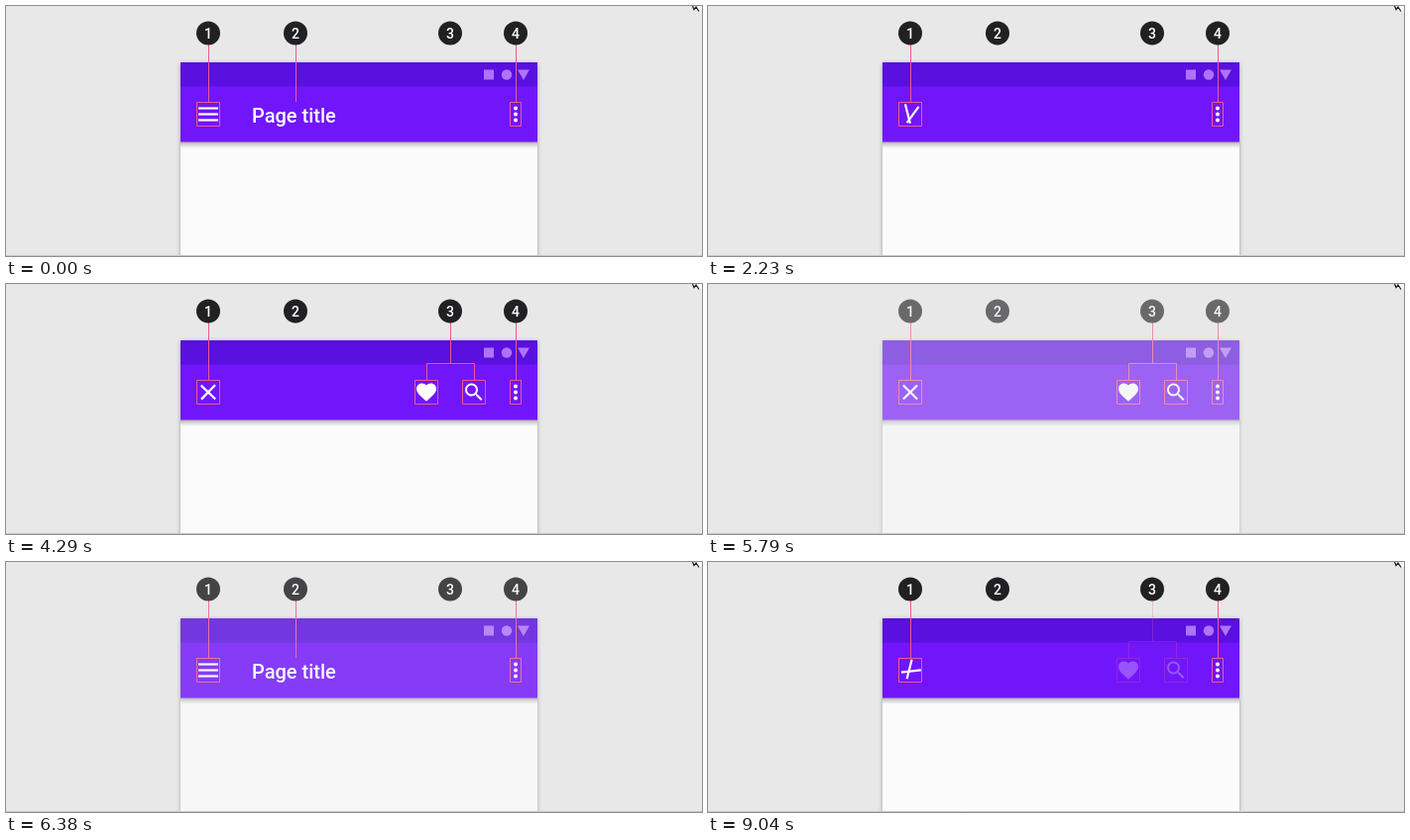
These frames come from a looping animation (702x253 px, 9.14 s). An HTML page:

```html
<!DOCTYPE html>
<html lang="en">
<head>
<meta charset="utf-8">
<title>Top app bar</title>
<style>
html, body { margin: 0; width: 100%; height: 100%; overflow: hidden; background: #e8e8e8; }
svg { display: block; width: 702px; height: 253px; font-family: Roboto, sans-serif; font-weight: 500; }
.guide { fill: none; stroke: #f0588f; stroke-width: 1; }
.badge text { font-size: 14px; fill: #fff; text-anchor: middle; }
</style>
</head>
<body>
<svg viewBox="0 0 702 253">
  <defs>
    <filter id="soft" x="-10%" y="-10%" width="120%" height="120%">
      <feDropShadow dx="0" dy="1" stdDeviation="2" flood-color="#000" flood-opacity=".32"/>
    </filter>
    <linearGradient id="under" x1="0" y1="0" x2="0" y2="1">
      <stop offset="0" stop-color="#000" stop-opacity=".36"/>
      <stop offset=".4" stop-color="#000" stop-opacity=".17"/>
      <stop offset="1" stop-color="#000" stop-opacity="0"/>
    </linearGradient>
  </defs>
  <rect width="702" height="253" fill="#e8e8e8"/>
  <g id="scene">
    <rect x="176" y="57" width="360" height="210" fill="#fbfbfb" filter="url(#soft)"/>
    <rect x="176" y="137" width="360" height="7" fill="url(#under)"/>
    <rect x="176" y="81" width="360" height="56.5" fill="#7116fb"/>
    <rect x="176" y="57" width="360" height="24.5" fill="#5a10df"/>
    <g fill="#ac75f7">
      <rect x="482" y="64.5" width="10" height="10"/>
      <circle cx="505" cy="69.5" r="5.2"/>
      <path d="M516 64.5h12l-6 10.5z"/>
    </g>
    <g id="title">
      <path class="guide" d="M292.5 39V97"/>
      <text x="248" y="117.7" font-size="20" fill="#fff">Page title</text>
    </g>
    <g id="actions">
      <path class="guide" d="M448.5 39V80.5M424.5 97.5V80.5H472.5V97.5M412.5 97.5h23v24h-23zM460.5 97.5h23v24h-23z"/>
      <g fill="#fff">
        <path transform="translate(412 97.5)" d="M12 21.35l-1.45-1.32C5.4 15.36 2 12.28 2 8.5 2 5.42 4.42 3 7.5 3c1.74 0 3.41.81 4.5 2.09C13.09 3.81 14.76 3 16.5 3 19.58 3 22 5.42 22 8.5c0 3.78-3.4 6.86-8.55 11.54z"/>
        <path transform="translate(460 97.5)" d="M15.5 14h-.79l-.28-.27A6.5 6.5 0 1 0 13.73 14.43l.27.28v.79l5 4.99L20.49 19zM9.5 14A4.5 4.5 0 1 1 9.5 5a4.5 4.5 0 0 1 0 9z"/>
      </g>
    </g>
    <path class="guide" d="M204.5 39V97.5M192.5 97.5h23v24h-23zM514.5 39V97.5M508.5 97.5h11v24h-11z"/>
    <g id="icon" stroke="#fff" stroke-width="2.2">
      <path id="top" d="M-10 0H10"/>
      <path id="mid" d="M-10 0H10"/>
      <path id="low" d="M-10 0H10"/>
    </g>
    <g fill="#fff">
      <circle cx="514" cy="103.5" r="2"/>
      <circle cx="514" cy="109.5" r="2"/>
      <circle cx="514" cy="115.5" r="2"/>
    </g>
    <g id="badges" class="badge"></g>
  </g>
  <path d="M0 252.5H702" stroke="#cbcbcb"/>
  <path d="M692 0h10v5l-4 1z" fill="#f8f8f8"/>
  <path d="M692.5 0l1.5 3.5 2-2.5 3 4.5" fill="none" stroke="#222" stroke-width="1.3"/>
</svg>
<script>
const LOOP = 9140, HOLD = 450, STEP = 148.1, REPLAY = 6368;
const OUT = 5640, SWAP = 6030, IN = 6450;
const $ = id => document.getElementById(id);
const ramp = (t, a, b) => Math.min(1, Math.max(0, (t - a) / (b - a)));

$('badges').innerHTML = [204, 292, 448, 514].map((x, i) =>
  `<circle cx="${x}" cy="27.5" r="12" fill="#212124"/><text x="${x}" y="32.5">${i + 1}</text>`).join('');

// cubic-bezier(.4, 0, .2, 1)
function ease(x) {
  let lo = 0, hi = 1;
  for (let i = 0; i < 24; i++) {
    const s = (lo + hi) / 2, r = 1 - s;
    if (1.2 * r * r * s + 0.6 * r * s * s + s * s * s < x) lo = s; else hi = s;
  }
  return lo * lo * (3 - 2 * lo);
}

// The clip advances in fixed steps after an opening hold.
function snap(t) {
  return t < HOLD - 3 ? 0 : HOLD + Math.floor((t - HOLD + 3) / STEP) * STEP;
}

function draw(ms) {
  const t = snap(ms % LOOP);
  const u = t < SWAP ? t : t - REPLAY;
  const p = u < 1000 ? 0 : ease(ramp(u, 860, 4500));
  const gap = 6 * (1 - p), tilt = 45 * p;

  $('scene').setAttribute('opacity', t < SWAP ? 1 - ramp(t, OUT, SWAP) : ramp(t, SWAP, IN));
  $('title').setAttribute('opacity', 1 - ramp(u, 1020, 1880));
  $('actions').setAttribute('opacity', ramp(u, 2220, 3920));
  $('icon').setAttribute('transform', `translate(204 109.5) rotate(${180 * p})`);
  $('top').setAttribute('transform', `translate(0 ${-gap}) rotate(${tilt})`);
  $('low').setAttribute('transform', `translate(0 ${gap}) rotate(${-tilt})`);
  $('mid').setAttribute('opacity', 1 - ramp(p, 0.1, 0.5));
}

const start = performance.now();
function tick() {
  draw(performance.now() - start);
  requestAnimationFrame(tick);
}
tick();
</script>
</body>
</html>
```
